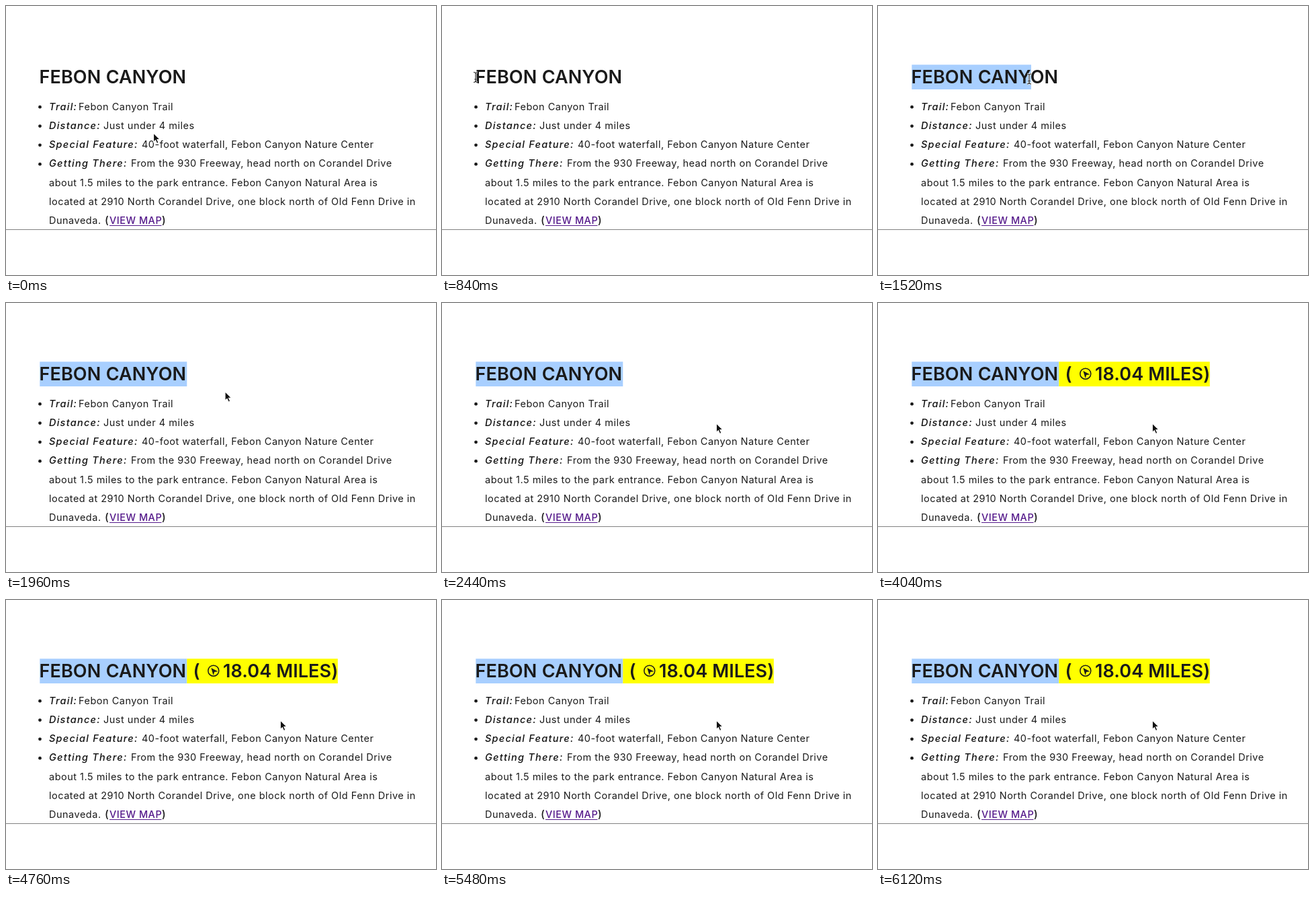
Write an HTML page that moves like this. It is 640 by 400 pixels and loops after 6.16 s.

```html
<!DOCTYPE html>
<html lang="en">
<head>
<meta charset="utf-8">
<title>Trail guide</title>
<style>
  html, body { margin: 0; width: 100%; height: 100%; overflow: hidden; background: #fff; }
  svg { display: block; width: 640px; height: 400px; }
  text { font-family: Inter, "Open Sans", sans-serif; fill: #1a1a1a; white-space: pre; }
  .head { font-size: 27px; font-weight: 600; letter-spacing: .1px; }
  .body { font-size: 14.5px; letter-spacing: .5px; }
  .label { font-size: 14.5px; font-weight: 500; font-style: italic; letter-spacing: 1.25px; fill: #111; }
  .paren { font-size: 15.5px; font-weight: 500; }
  .link { font-size: 14.5px; font-weight: 500; letter-spacing: .5px; fill: #551a8b; }
</style>
</head>
<body>
<svg viewBox="0 0 640 400">
  <rect id="selection" x="50.3" y="87.3" width="0" height="36.7" fill="#a8cfff"/>
  <rect id="mark" x="269.3" y="87.3" width="224.5" height="36.7" fill="#ff0"/>
  <g id="copy"></g>
  <g id="distance">
    <text class="head" x="278.5" y="115">(</text>
    <circle cx="308.8" cy="105.2" r="8" fill="none" stroke="#1a1a1a" stroke-width="1.5"/>
    <path id="needle" d="M0-5.4L4.5 5L0 2.2L-4.5 5Z" fill="#1a1a1a"/>
    <text class="head" x="323" y="115">18.04 MILES)</text>
  </g>
  <path d="M154 326.5H231.5" stroke="#551a8b"/>
  <path d="M0 332.5H640" stroke="#828282"/>
  <path id="arrow" d="M0 0V13.6L3 10.9L5.2 15.7L7.7 14.6L5.6 9.9H9.8Z"
        fill="#111" stroke="#fff" stroke-width="1.2"/>
  <g id="beam" fill="none">
    <path d="M-3-7.5Q0-7.5 0-5V5Q0 7.5-3 7.5M3-7.5Q0-7.5 0-5M0 5Q0 7.5 3 7.5M-1.7 3H1.7" stroke="#fff" stroke-width="2.4"/>
    <path d="M-3-7.5Q0-7.5 0-5V5Q0 7.5-3 7.5M3-7.5Q0-7.5 0-5M0 5Q0 7.5 3 7.5M-1.7 3H1.7" stroke="#222" stroke-width="1.1"/>
  </g>
</svg>
<script>
const LOOP = 6160, STEP = 40;
const DRAG_START = 920, DRAG_END = 1840, LABEL_AT = 2760;
const LEFT = 50.3, RIGHT = 269.3;
const $ = id => document.getElementById(id);
const NS = 'http://www.w3.org/2000/svg';

function add(tag, attrs, content = '') {
  const el = document.createElementNS(NS, tag);
  for (const key in attrs) el.setAttribute(key, attrs[key]);
  el.textContent = content;
  $('copy').append(el);
}

const rowY = row => 154.5 + row * 28.33;
const write = (cls, x, row, content) => add('text', { class: cls, x, y: rowY(row) }, content);

add('text', { class: 'head', x: 49.5, y: 115 }, 'FEBON');
add('text', { class: 'head', x: 148.7, y: 115 }, 'CANYON');

[
  ['Trail:', 108, 'Febon Canyon Trail'],
  ['Distance:', 145, 'Just under 4 miles'],
  ['Special Feature:', 202, '40-foot waterfall, Febon Canyon Nature Center'],
  ['Getting There:', 186, 'From the 930 Freeway, head north on Corandel Drive']
].forEach(([label, x, value], row) => {
  add('circle', { cx: 50.5, cy: rowY(row) - 4.3, r: 2.4, fill: '#1a1a1a' });
  write('label', 64, row, label);
  write('body', x, row, value);
});
write('body', 64, 4, 'about 1.5 miles to the park entrance. Febon Canyon Natural Area is');
write('body', 64, 5, 'located at 2910 North Corandel Drive, one block north of Old Fenn Drive in');
write('body', 64, 6, 'Dunaveda.');
write('paren', 147, 6, '(');
write('link', 154, 6, 'VIEW MAP');
write('paren', 232, 6, ')');

// time, x, y
const path = [
  [0, 219.5, 188.8], [160, 212, 181], [400, 126, 136], [640, 56, 107],
  [800, 50, 106], [920, 50, 106], [1160, 98, 107], [1520, 225, 108.5],
  [1720, 277, 110], [1840, 292, 113], [2080, 360, 150], [2280, 408.3, 178.8]
];
// left, top, right, bottom of the lines the pointer crosses
const lines = [[50, 87, 269, 124], [64, 139, 248, 159], [64, 168, 281, 187]];
const letterEdges = [LEFT, 66, 83, 101, 121, 142, 149, 169, 189, 210, 228, 249, RIGHT];

function pointer(t) {
  const i = path.findIndex(p => p[0] > t);
  if (i < 0) return path[path.length - 1].slice(1);
  const [t0, x0, y0] = path[i - 1], [t1, x1, y1] = path[i];
  const k = (t - t0) / (t1 - t0);
  return [x0 + (x1 - x0) * k, y0 + (y1 - y0) * k];
}

const nearest = (list, x) => list.reduce((a, b) => Math.abs(b - x) < Math.abs(a - x) ? b : a);
const show = (id, on) => $(id).setAttribute('visibility', on ? 'visible' : 'hidden');

function draw(t) {
  const [x, y] = pointer(t);
  const dragging = t >= DRAG_START && t < DRAG_END;
  const overText = lines.some(([l, top, r, b]) => x >= l && x <= r && y >= top && y <= b);
  const beam = dragging || overText;
  show('beam', beam);
  show('arrow', !beam);
  $(beam ? 'beam' : 'arrow').setAttribute('transform', `translate(${x} ${y})`);

  const end = t < DRAG_START ? LEFT : dragging ? nearest(letterEdges, x) : RIGHT;
  $('selection').setAttribute('width', end - LEFT);

  show('mark', t >= LABEL_AT);
  show('distance', t >= LABEL_AT);
  const k = Math.min(1, Math.max(0, (t - 3160) / 440));
  const angle = -90 + 50 * k * k * (3 - 2 * k);
  $('needle').setAttribute('transform', `translate(308.8 105.2) rotate(${angle})`);
}

const start = performance.now();
function tick() {
  const t = (performance.now() - start) % LOOP;
  draw(Math.floor(t / STEP) * STEP);
  requestAnimationFrame(tick);
}
tick();
</script>
</body>
</html>
```
